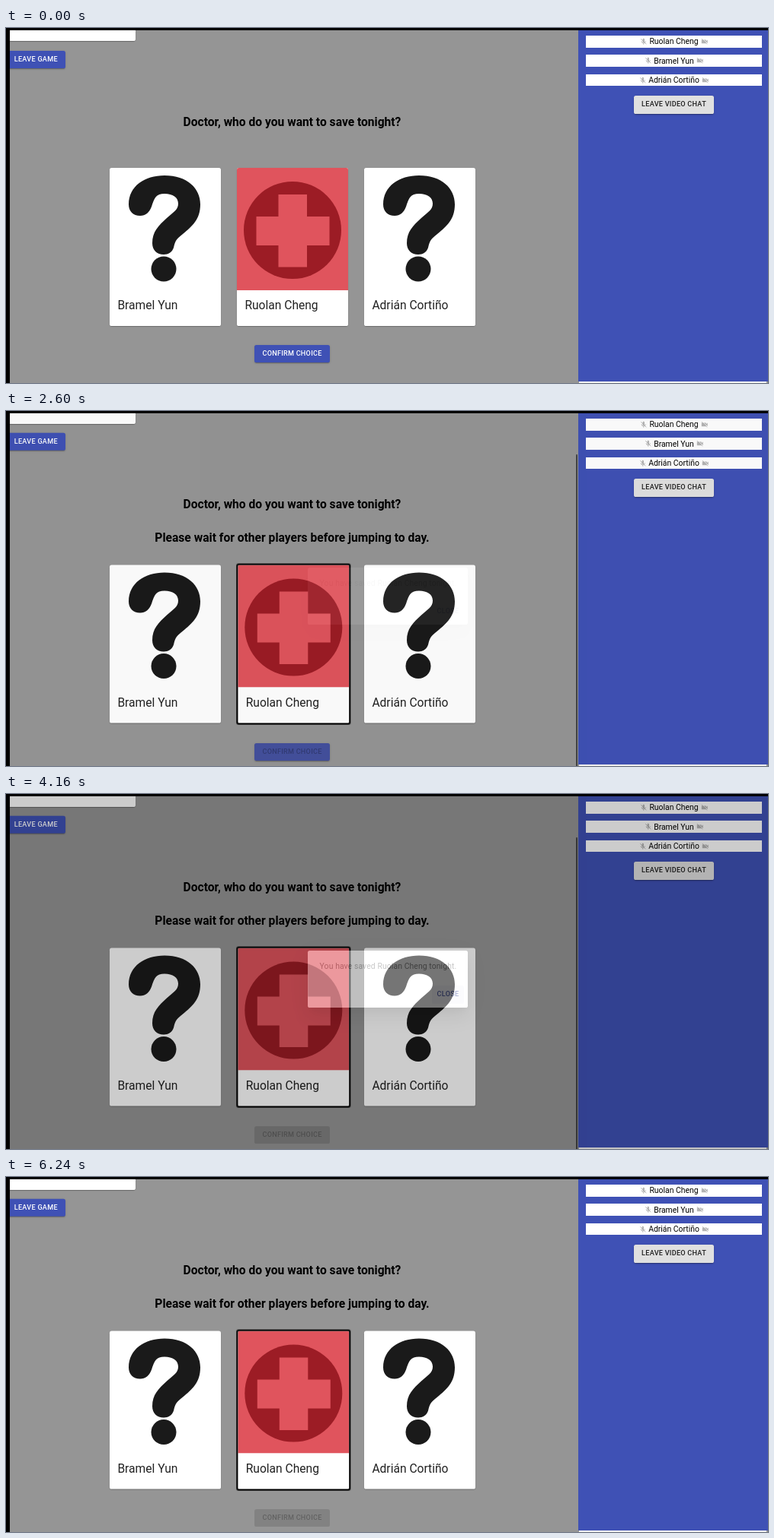
An HTML page that plays this animation: 1000x467 px, repeating every 6.37 s.

```html
<!DOCTYPE html>
<html lang="en">
<head>
<meta charset="utf-8">
<title>Night round</title>
<style>
  :root {
    --loop: 6.37s;
    --blue: #3f51b5;
    --raise1: 0 1.3px .7px -.7px rgba(0,0,0,.2), 0 .7px .7px rgba(0,0,0,.14), 0 .7px 2px rgba(0,0,0,.12);
    --raise2: 0 2px .7px -1.3px rgba(0,0,0,.2), 0 1.3px 1.3px rgba(0,0,0,.14), 0 .7px 3.3px rgba(0,0,0,.12);
    --raise4: 0 1.3px 2.6px -.7px rgba(0,0,0,.2), 0 2.6px 3.3px rgba(0,0,0,.14), 0 .7px 6.5px rgba(0,0,0,.12);
    --raise24: 0 7px 10px -4.5px rgba(0,0,0,.2), 0 15.6px 25px 2px rgba(0,0,0,.14), 0 6px 30px 5px rgba(0,0,0,.12);
  }
  html, body { margin: 0; width: 100%; height: 100%; overflow: hidden; background: #000; }
  #stage {
    position: relative; width: 1000px; height: 467px; overflow: hidden;
    background: #959595; font-family: Roboto, Arial, sans-serif; color: #000;
  }
  #stage div { position: absolute; box-sizing: border-box; white-space: nowrap; }
  /* one tick is 130 ms, 49 ticks per loop */
  .anim { animation: var(--loop) step-end infinite; }

  .bar { background: #000; }
  .field { left: 0; top: 0; width: 169.5px; height: 16.5px; background: #fff; border-radius: 2.6px; box-shadow: var(--raise1); }
  .btn {
    height: 23.7px; line-height: 23.7px; border-radius: 2.6px; text-align: center;
    font-size: 9.1px; font-weight: 500; letter-spacing: .02857em;
    color: #fff; background: var(--blue); box-shadow: var(--raise2);
  }
  .leave { left: .6px; top: 29.5px; width: 77.4px; animation-name: rise; }
  .confirm { left: 326px; top: 416.7px; width: 99px; animation-name: sink, press; }
  .title {
    left: 5px; width: 741px; height: 24px; line-height: 24px; text-align: center;
    font-size: 15.6px; font-weight: 700;
  }
  .ask { top: 112px; animation-name: rise; }
  .wait { top: 155px; animation-name: reveal; }
  .thumb { left: 748px; top: 58.5px; width: 2px; height: 420px; background: #444; border-radius: 1px; animation-name: thumb; }

  .cards { left: 0; top: 184px; animation-name: drop; }
  .card { width: 146px; height: 208px; border-radius: 2.6px; background: #fff; box-shadow: var(--raise1); }
  .card svg { display: block; width: 146px; height: 161px; border-radius: 2.6px 2.6px 0 0; }
  .name { left: 10.4px; top: 171px; line-height: 20.8px; font-size: 15.6px; color: rgba(0,0,0,.87); }
  .pick { animation-name: nudge; }
  .veil { inset: 0; overflow: hidden; border-radius: 2.6px; }
  .shade { inset: 0; background: rgba(0,0,0,.045); animation-name: hover; }
  .ripple { left: 48px; top: 70px; width: 84px; height: 84px; border-radius: 50%; background: rgba(20,20,20,.15); animation-name: ripple; }
  .frame { inset: -1.6px; border: 2px solid #000; border-radius: 3px; animation-name: frame; }

  .panel { left: 751px; top: 0; width: 249px; height: 465px; background: var(--blue); }
  .edge { left: 752px; top: 464.6px; width: 246px; height: 3px; background: #f2f2f2; }
  #stage .row {
    left: 10px; width: 231px; height: 15.4px; background: #fff; font-size: 10.4px;
    display: flex; align-items: center; justify-content: center; gap: 3px;
  }
  .row svg { width: 9.5px; height: 9.5px; }
  .chat { left: 73px; top: 89px; width: 105px; color: rgba(0,0,0,.87); background: #e0e0e0; }

  .modal { inset: 0; animation-name: modal; }
  .dim { inset: 0; background: rgba(0,0,0,.5); }
  .dialog { left: 396px; top: 205.5px; width: 210px; height: 75.5px; border-radius: 2.6px; background: #fff; box-shadow: var(--raise24); }
  .note { left: 15.6px; top: 13.2px; line-height: 15.6px; font-size: 10.4px; letter-spacing: .00938em; color: rgba(0,0,0,.54); }
  .close { right: 5.2px; bottom: 5.2px; width: 41.6px; color: #3b4a9a; background: none; box-shadow: none; animation-name: close; }

  @keyframes rise { 0% { transform: none } 18.367%, to { transform: translateY(-1.2px) } }
  @keyframes sink {
    0% { transform: none }
    18.367% { transform: translateY(1.5px) }
    40.816%, to { transform: translateY(20px) }
  }
  @keyframes drop { 0% { transform: none } 40.816%, to { transform: translateY(18.6px) } }
  @keyframes nudge { 0% { transform: none } 18.367%, to { transform: translateX(1.3px) } }
  @keyframes frame { 0% { opacity: 0 } 18.367%, to { opacity: 1 } }
  @keyframes reveal { 0% { opacity: 0 } 40.816%, to { opacity: 1 } }
  @keyframes thumb {
    0% { opacity: 0; transform: none }
    18.367% { opacity: 1; transform: none }
    40.816% { opacity: 1; transform: translateY(-1.7px) }
    79.591% { opacity: .5; transform: translateY(-1.7px) }
    81.632%, to { opacity: 0; transform: translateY(-1.7px) }
  }
  @keyframes hover {
    0% { opacity: 0 }
    10.204% { opacity: .3 }
    12.244% { opacity: .75 }
    14.285% { opacity: 1 }
    28.571% { opacity: .5 }
    30.612%, to { opacity: 0 }
  }
  @keyframes ripple {
    0% { opacity: 0; transform: scale(0) }
    18.367% { opacity: 1; transform: scale(.3) }
    20.408% { opacity: 1; transform: none }
    22.448% { opacity: .8; transform: scale(2.4) }
    24.489% { opacity: .4; transform: scale(4) }
    26.53%, to { opacity: 0; transform: scale(4.4) }
  }
  @keyframes press {
    0% { background: var(--blue); color: #fff; box-shadow: var(--raise2) }
    32.653% { background: #3b4caf; color: #fff; box-shadow: var(--raise2) }
    34.693% { background: #3443a4; color: #fff; box-shadow: var(--raise4) }
    36.734% { background: #303f9f; color: #fff; box-shadow: var(--raise4) }
    40.816% { background: rgba(48,63,159,.8); color: rgba(0,0,0,.26); box-shadow: var(--raise2) }
    42.857% { background: rgba(24,32,90,.22); color: rgba(0,0,0,.26); box-shadow: none }
    44.897%, to { background: rgba(0,0,0,.12); color: rgba(0,0,0,.26); box-shadow: none }
  }
  @keyframes modal {
    0% { opacity: 0 }
    40.816% { opacity: .05 }
    42.857% { opacity: .92 }
    44.897% { opacity: 1 }
    65.306% { opacity: .4 }
    67.346%, to { opacity: 0 }
  }
  @keyframes close {
    0% { background: rgba(63,81,181,0) }
    57.142% { background: rgba(63,81,181,.025) }
    59.183%, to { background: rgba(63,81,181,.05) }
  }
</style>
</head>
<body>
<svg width="0" height="0" style="position:absolute">
  <symbol id="unknown" viewBox="136 184 146 161">
    <path fill="#1a1a1a" d="M161 232C161 208 182 194 208 194C238 194 255 211 255 232C255 252 244 261 232 271C222 279 222 281 220 289C218 295 213 298 207 298C198 298 192 292 192 283C192 268 200 260 211 250C220 242 226 239 226 231C226 223 219 218 208 218C197 218 195 223 191 235C188 243 183 247 176 247C167 247 161 241 161 232Z"/>
    <circle cx="207" cy="317" r="16.5" fill="#1a1a1a"/>
  </symbol>
  <symbol id="medic" viewBox="0 0 146 161">
    <path fill="#e0545d" d="M0 0h146v161H0z"/>
    <circle cx="73" cy="82" r="64" fill="#9c1c25"/>
    <path fill="#e0545d" d="M54.500 35h37.500v29h29.500v38h-29.500v28.500h-37.500v-28.500h-29v-38h29z"/>
  </symbol>
  <symbol id="mic" viewBox="0 0 24 24">
    <rect x="9" y="2" width="6" height="13" rx="3" fill="#b4b4b4"/>
    <path d="M5.500 11a6.500 6.500 0 0 0 13 0M12 17.500V22M3 3l18 18" fill="none" stroke="#a8a8a8" stroke-width="2"/>
  </symbol>
  <symbol id="cam" viewBox="0 0 24 24">
    <path fill="#b4b4b4" d="M2 6h15v4.500l5-4.500v12l-5-4.500V18H2z"/>
    <path d="M4 2l18 18" stroke="#fff" stroke-width="2"/>
    <path d="M2.500 3l18 18" stroke="#a8a8a8" stroke-width="2"/>
  </symbol>
</svg>

<div id="stage">
  <div class="field"></div>
  <div class="btn leave anim">LEAVE GAME</div>
  <div class="title ask anim">Doctor, who do you want to save tonight?</div>
  <div class="title wait anim">Please wait for other players before jumping to day.</div>

  <div class="cards anim">
    <div class="card" style="left:136px">
      <svg><use href="#unknown"/></svg>
      <div class="name">Bramel Yun</div>
    </div>
    <div class="card pick anim" style="left:303px">
      <svg><use href="#medic"/></svg>
      <div class="name">Ruolan Cheng</div>
      <div class="veil">
        <div class="shade anim"></div>
        <div class="ripple anim"></div>
      </div>
      <div class="frame anim"></div>
    </div>
    <div class="card" style="left:470px">
      <svg><use href="#unknown"/></svg>
      <div class="name">Adrián Cortiño</div>
    </div>
  </div>
  <div class="btn confirm anim">CONFIRM CHOICE</div>
  <div class="thumb anim"></div>

  <div class="panel">
    <div class="row" style="top:10.2px"><svg><use href="#mic"/></svg><span>Ruolan Cheng</span><svg><use href="#cam"/></svg></div>
    <div class="row" style="top:35.4px"><svg><use href="#mic"/></svg><span>Bramel Yun</span><svg><use href="#cam"/></svg></div>
    <div class="row" style="top:60.6px"><svg><use href="#mic"/></svg><span>Adrián Cortiño</span><svg><use href="#cam"/></svg></div>
    <div class="btn chat">LEAVE VIDEO CHAT</div>
  </div>
  <div class="edge"></div>

  <div class="modal anim">
    <div class="dim"></div>
    <div class="dialog">
      <div class="note">You have saved Ruolan Cheng tonight.</div>
      <div class="btn close anim">CLOSE</div>
    </div>
  </div>

  <div class="bar" style="left:0;top:0;width:1000px;height:2.5px"></div>
  <div class="bar" style="left:0;top:0;width:5px;height:467px"></div>
</div>
</body>
</html>
```
